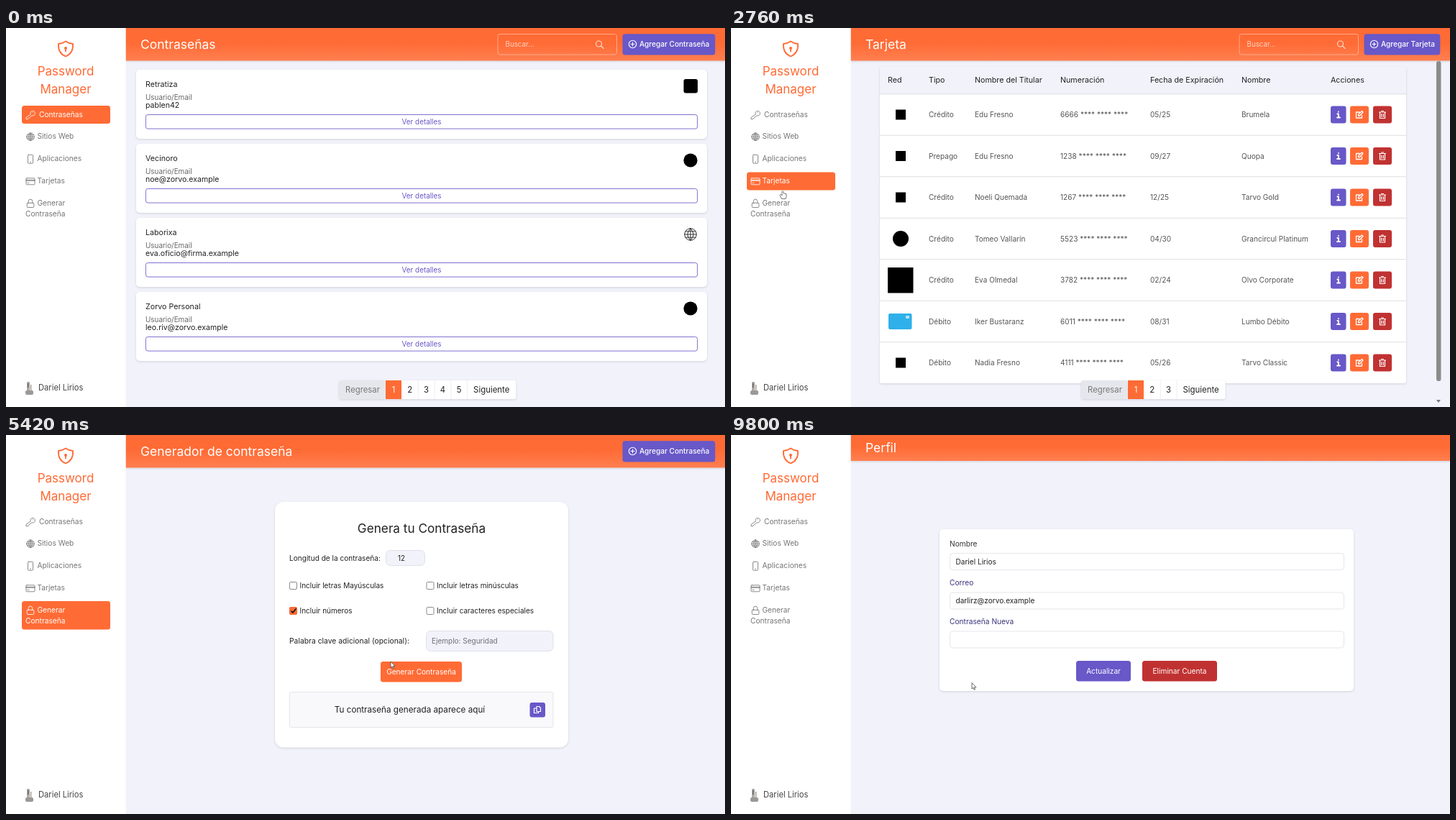
An HTML page for the animation above (9.82 s loop, 1000 by 527 pixels).

```html
<!DOCTYPE html>
<html lang="es">
<head>
<meta charset="utf-8">
<title>Password Manager</title>
<style>
html, body { margin: 0; height: 100%; overflow: hidden; background: #f2f2fb; }
svg { display: block; width: 100%; height: 100%; font-family: Inter, "Open Sans", sans-serif; }
text { white-space: pre; }
.card { filter: drop-shadow(0 1px 1.5px #0002); }
.drop { filter: drop-shadow(0 3px 5px #0005); }
</style>
</head>
<body>
<svg id="stage" viewBox="0 0 1000 527">
  <defs>
    <linearGradient id="bar" x2="0" y2="1">
      <stop offset=".45" stop-color="#ff6b35"/><stop offset="1" stop-color="#ff7f50"/>
    </linearGradient>
  </defs>
</svg>
<script>
const ORANGE = '#ff6b35', PURPLE = '#6858c8', RED = '#c03231', PALE = '#f2f2fb', GREY = '#757575', INK = '#222';
const LOOP = 9820;

// Drawing helpers; text is placed by its vertical centre
const text = (x, cy, size, str, fill = INK, anchor = 'start', weight = 400) =>
  `<text x="${x}" y="${cy + size * .36}" font-size="${size}" fill="${fill}" text-anchor="${anchor}" font-weight="${weight}">${str}</text>`;
const mid = (x, cy, size, str, fill, weight) => text(x, cy, size, str, fill, 'middle', weight);
const rect = (x, y, w, h, fill, r = 0, extra = '') =>
  `<rect x="${x}" y="${y}" width="${w}" height="${h}" rx="${r}" fill="${fill}" ${extra}/>`;
const outline = (x, y, w, h, stroke, r, fill = 'none') => rect(x, y, w, h, fill, r, `stroke="${stroke}" stroke-width=".85"`);
const line = (d, stroke, width = 1) =>
  `<path d="${d}" fill="none" stroke="${stroke}" stroke-width="${width}" stroke-linecap="round" stroke-linejoin="round"/>`;
const shape = (d, stroke) => `<path d="${d}" fill="#fff" stroke="${stroke}" stroke-width=".8"/>`;
const at = (x, y, body) => `<g transform="translate(${x} ${y})">${body}</g>`;
const group = (id, body) => `<g id="${id}">${body}</g>`;
const card = body => `<g class="card">${body}</g>`;
const ring = r => `M${-r} 0a${r} ${r} 0 1 0 ${2 * r} 0a${r} ${r} 0 1 0 ${-2 * r} 0`;
const globe = r => ring(r) + `M${-r} 0H${r}M0 ${-r}V${r}M0 ${-r}q${-r} ${r} 0 ${2 * r}q${r} ${-r} 0 ${-2 * r}` +
  `M${-r * .85} ${-r / 2}H${r * .85}M${-r * .85} ${r / 2}H${r * .85}`;

// Sidebar
const icons = [
  'M0-1a3.3 3.3 0 1 1 2 2L-4 6H-6V4ZM3-3h.3',
  globe(5.3),
  'M-2.5-6h5q1 0 1 1V5q0 1-1 1h-5q-1 0-1-1V-5q0-1 1-1ZM-.6 4H.6',
  'M-5-4.5H5q1 0 1 1v7q0 1-1 1H-5q-1 0-1-1v-7q0-1 1-1ZM-6-2H6M-6-1H6M-4 2h2',
  'M-4-.5h8q.8 0 .8.8v4.4q0 1-1 1h-7.6q-1 0-1-1V.3q0-.8.8-.8ZM-2.7-.5V-3a2.7 2.7 0 0 1 5.4 0v2.5'
];
const items = [
  { label: 'Contraseñas', x: 46, y: 108, h: 25 },
  { label: 'Sitios Web', x: 43.5, y: 138.5, h: 25.5 },
  { label: 'Aplicaciones', x: 43.5, y: 169.5, h: 25.5 },
  { label: 'Tarjetas', x: 43.5, y: 200.5, h: 25 },
  { label: 'Generar', x: 43.5, y: 231, h: 39.5 }
];
function itemBody(i, color) {
  const { label, x, y } = items[i], cy = y + 12.3;
  return at(34, cy + .5, line(icons[i], color, .85)) + text(x, cy, 10.2, label, color) +
    (i === 4 ? text(27, 258, 10.2, 'Contraseña', color) : '');
}
const itemState = (kind, i, bg, color) =>
  group(kind + i, rect(22, items[i].y, 123, items[i].h, bg, 3.5) + itemBody(i, color));

const avatar = rect(29, 492, 4, 14, '#aaa', 1) + rect(32, 496, 4, 13, '#cbc5be') +
  rect(27, 504, 11, 6, '#999', 2) + rect(30, 494, 1.5, 6, '#666');

const sidebar = rect(0, 0, 166.5, 527, '#fff') +
  at(83, 29, line('M0-10.5Q5-7 10-7Q11 6 0 10.5Q-11 6-10-7Q-5-7 0-10.5Z', ORANGE, 1.8) +
    `<circle cy="-1" r="2" fill="${ORANGE}"/>` + line('M0 0V3.5', ORANGE, 1.8)) +
  mid(83, 60, 17, 'Password', ORANGE) + mid(83, 85, 17, 'Manager', ORANGE) +
  items.map((_, i) => itemBody(i, GREY) + itemState('hover', i, PALE, '#333') + itemState('active', i, ORANGE, '#fff')).join('') +
  avatar + text(45, 500, 11.2, 'Dariel Lirios', '#444') +
  group('menu', `<g class="drop">${outline(22.5, 422.5, 108, 66, '#ccc', 3, '#fff')}</g>` +
    group('overPerfil', rect(23, 423, 107, 32, '#f4f5f6')) + group('overSalir', rect(23, 457, 107, 31, '#f4f5f6')) +
    line('M23 456H130', '#ddd') + text(33, 439, 10.6, 'Perfil') + text(33, 472, 10.6, 'Salir', '#666'));

// Shared page parts
function header(title, label, left, search, h = 45.5) {
  let out = card(rect(166.5, 0, 833.5, h, 'url(#bar)')) + text(187, h / 2, 17.5, title, '#fff');
  if (search) out += outline(left - 173.5, 8.5, 165.5, 28.5, '#ffb598', 3) + text(left - 163, 22.5, 9.8, 'Buscar...', '#ffd3c2') +
    at(left - 33, 22, line(ring(4) + 'M3 3L6.5 6.5', '#ffe1d5', 1.1));
  if (label) out += rect(left, 8.3, 986.3 - left, 29.2, PURPLE, 3.5) +
    at(left + 14, 22.5, line(ring(5.2) + 'M-2.5 0h5M0-2.5v5', '#fff', 1.1)) +
    text(left + 23.5, 22.5, 10.1, label, '#fff', 'start', 500);
  return out;
}
function pager(x, count) {
  const first = x + 76, step = 22.8, end = first + step * (count - 1);
  let out = card(rect(x, 490, end + 79 - x, 26, '#fff', 3)) + rect(x, 490, 65, 26, '#e6e7ec', 3) +
    rect(x + 65, 490, 22, 26, ORANGE) + mid(x + 33, 503, 11.3, 'Regresar', '#777');
  for (let i = 0; i < count; i++) {
    out += mid(first + step * i, 503, 11.3, i + 1, i ? INK : '#fff');
    if (i) out += line(`M${first + step * i + 11.5} 490.5v25`, '#eee');
  }
  return out + mid(end + 45, 503, 11.4, 'Siguiente');
}
const button = (x, y, w, h, label, fill) => rect(x, y, w, h, fill, 3.5) + mid(x + w / 2, y + h / 2, 10.15, label, '#fff');

// Password list
const disc = '<circle cx="952" cy="81" r="9.6"/>';
const accounts = [
  ['Retratiza', 'pablen42', rect(942.5, 71, 19.5, 19.5, '#000', 3)],
  ['Vecinoro', 'noe@zorvo.example', disc],
  ['Laborixa', 'eva.oficio@firma.example', at(952, 81, line(globe(8.3), INK, .9))],
  ['Zorvo Personal', 'leo.riv@zorvo.example', disc]
];
const passwords = header('Contraseñas', 'Agregar Contraseña', 857.5, true) +
  accounts.map(([name, user, mark], i) => at(0, 103 * i,
    card(rect(181, 58, 794, 96, '#fff', 5)) + text(194, 78, 10.7, name) +
    text(194, 96, 9.9, 'Usuario/Email', '#666') + text(194, 107.5, 10.6, user) + mark +
    outline(194.4, 120.5, 767.2, 19.6, PURPLE, 3) + mid(578, 130, 9.9, 'Ver detalles', PURPLE))).join('') + pager(463, 5);

// Card table
const columns = [218, 275, 339, 458, 583, 710, 834];
const titles = ['Red', 'Tipo', 'Nombre del Titular', 'Numeración', 'Fecha de Expiración', 'Nombre', 'Acciones'];
const rows = [
  ['small', 'Crédito', 'Edu Fresno', '6666', '05/25', 'Brumela'],
  ['small', 'Prepago', 'Edu Fresno', '1238', '09/27', 'Quopa'],
  ['small', 'Crédito', 'Noeli Quemada', '1267', '12/25', 'Tarvo Gold'],
  ['dot', 'Crédito', 'Tomeo Vallarín', '5523', '04/30', 'Grancircul Platinum'],
  ['large', 'Crédito', 'Eva Olmedal', '3782', '02/24', 'Olvo Corporate'],
  ['blue', 'Débito', 'Iker Bustaranz', '6011', '08/31', 'Lumbo Débito'],
  ['small', 'Débito', 'Nadia Fresno', '4111', '05/26', 'Tarvo Classic']
];
const marks = {
  small: rect(229, -7, 14, 14, '#000'),
  dot: '<circle cx="236" r="11"/>',
  large: rect(218, -17.5, 35.5, 35.5, '#000'),
  blue: rect(219, -11, 32.5, 22, '#2fb0ea', 2) + rect(243, -8, 5, 4, '#b9e3f6', 1)
};
const actions = rect(834, -12, 21.5, 24, PURPLE, 3) + rect(861, -12, 26, 24, ORANGE, 3) + rect(893, -12, 26, 24, RED, 3) +
  line('M844.9-4v.2M843.3-1h1.6v5M843 4h4', '#fff', 1.8) +
  at(874, 0, line('M0-3.5H-4.5V4.5H3.5V1M-1.5 1.5V-.5L3.5-5L5-3.5L.5 1.5Z', '#fff', 1.3)) +
  at(906, 0, line('M-4.5-3.5h9M-1.5-5h3M-3.5-3.5V5h7V-3.5M-1.3-1V3M1.3-1V3', '#fff', 1.2));
const cards = header('Tarjeta', 'Agregar Tarjeta', 880.5, true) +
  card(rect(207, 54, 732, 440, PALE, 4) + rect(207, 92, 732, 402, '#fff', 3)) +
  titles.map((title, i) => text(columns[i], 72.5, 10.7, title)).join('') +
  rows.map(([mark, ...cells], i) => at(0, 120.5 + 57.5 * i,
    marks[mark] + actions + line('M207-28.7H939', '#dcdce0', .9) +
    cells.map((cell, c) => text(columns[c + 1], 0, 10.1, c === 2 ? cell + ' **** **** ****' : cell, '#555')).join(''))).join('') +
  pager(487, 3) + rect(981, 46, 6.5, 445, '#8b8b8b', 3) + '<path d="M981 517h6l-3 4z" fill="#777"/>';

// Generator
const checkbox = (x, y, label) => outline(x + .5, y - 5, 10, 10, '#777', 1.5, '#fff') + text(x + 14.5, y, 10, label);
const generator = header('Generador de contraseña', 'Agregar Contraseña', 857.5) +
  card(rect(374, 93, 408, 341.5, '#fff', 12)) + mid(578, 129.5, 17.2, 'Genera tu Contraseña') +
  text(394, 171, 10.1, 'Longitud de la contraseña:') + outline(528.5, 160.5, 54, 21, '#dcdce6', 6, PALE) + mid(550, 171, 9.9, '12') +
  checkbox(394, 209.5, 'Incluir letras Mayúsculas') + checkbox(584.5, 209.5, 'Incluir letras minúsculas') +
  checkbox(394, 244.5, 'Incluir números') + checkbox(584.5, 244.5, 'Incluir caracteres especiales') +
  group('check', outline(394.5, 239.5, 10, 10, ORANGE, 1.5, ORANGE) + line('M397 245l2 2 4-5', '#111', 1.7)) +
  text(394, 286.5, 10.35, 'Palabra clave adicional (opcional):') +
  outline(584.5, 272.5, 176.5, 28, '#dcdce6', 6, PALE) + text(592, 286.5, 10, 'Ejemplo: Seguridad', '#6f6f78') +
  button(521, 315, 113, 28.5, 'Generar Contraseña', ORANGE) +
  outline(394.5, 357.5, 366.5, 49, '#e2e2e6', 2, '#f9f9fb') +
  group('empty', mid(561.5, 382, 11.7, 'Tu contraseña generada aparece aquí')) + group('result', mid(562, 382, 11, '759695405609')) +
  rect(728.5, 372, 21.5, 20.5, PURPLE, 3) +
  at(739, 382, line('M-1-4.5H2.5L4.5-2.5V2.5H-1ZM-1-2H-4.5V4.5H1.5V2.5', '#fff', 1.2));

// Profile
const field = (y, label, value, color) => text(304, y, 10.2, label, color) +
  outline(304.5, y + 13.5, 548, 23, '#e2e2ea', 4, '#fff') + text(312.5, y + 25, 10.1, value);
const profile = header('Perfil', '', 0, false, 36) + card(rect(290, 131, 576, 225, '#fff', 5)) +
  field(151, 'Nombre', 'Dariel Lirios', '#333') + field(205.5, 'Correo', 'darlirz@zorvo.example', '#39337c') +
  field(259.5, 'Contraseña Nueva', '', '#39337c') +
  button(480, 314, 76, 28.5, 'Actualizar', PURPLE) + button(572, 314, 104, 28.5, 'Eliminar Cuenta', RED);

const pointers =
  group('hand', shape('M-1 1.5V7L-2.5 5.5Q-4 5.5-4 6.5L-1.5 11.5H4L5 8V4.8L1 3.8V1.5Q0-.5-1 1.5Z', '#555')) +
  group('arrow', shape('M0 0V8.5L2 6.8L3.3 9.8L4.6 9.2L3.3 6.3H6Z', '#444'));

const pages = [[0, 'passwords', passwords], [2380, 'cards', cards], [3950, 'generator', generator], [9060, 'profile', profile]];
const stage = document.getElementById('stage');
stage.innerHTML += pages.map(([, id, body]) => group(id, body)).join('') + sidebar + group('cursor', pointers);

const el = {};
stage.querySelectorAll('g[id]').forEach(g => el[g.id] = g);
const show = (id, on) => el[id].style.display = on ? '' : 'none';

// Timeline: active menu entry, then pointer positions
const selected = [[-999, 0], [1120, 1], [1525, 2], [2370, 3], [4010, 4], [9060, -1]];
const track = [
  [90, 430, 540], [1030, 90, 151], [1350, 88, 153], [1610, 83, 193], [1800, 78, 211], [2690, 74, 215],
  [2760, 72, 226], [2840, 69, 240], [3430, 66, 243], [4050, 66, 243], [4460, 399, 243], [4660, 399, 244],
  [4810, 403, 247], [5420, 535, 315], [5700, 562, 328], [5900, 562, 328], [6780, 75, 499], [7100, 75, 499],
  [7900, 103, 470], [8200, 105, 471], [8350, 105, 471], [8800, 66, 439], [9060, 66, 439], [9530, 335, 344.5], [LOOP, 335, 344.5]
];
const clamp = v => Math.max(0, Math.min(1, v));
function pointerAt(t) {
  const i = Math.max(1, track.findIndex(k => k[0] > t));
  const [t0, x0, y0] = track[i - 1], [t1, x1, y1] = track[i];
  const p = clamp((t - t0) / (t1 - t0)), e = p * p * (3 - 2 * p);
  return [x0 + (x1 - x0) * e, y0 + (y1 - y0) * e];
}

function render(t) {
  const page = pages.findLast(p => p[0] <= t)[1];
  pages.forEach(p => show(p[1], p[1] === page));

  const [x, y] = pointerAt(t), inSidebar = x > 22 && x < 145;
  const step = selected.findLastIndex(s => s[0] <= t), fade = clamp((t - selected[step][0]) / 150);
  items.forEach((item, i) => {
    const on = i === selected[step][1] ? fade : step && i === selected[step - 1][1] ? 1 - fade : 0;
    el['active' + i].style.opacity = on;
    show('hover' + i, inSidebar && y > item.y && y < item.y + item.h);
  });

  show('check', t >= 4630);
  show('empty', t < 5790);
  show('result', t >= 5790);
  show('menu', t >= 6940 && t < 9060);
  show('overPerfil', inSidebar && y > 423 && y < 455);
  show('overSalir', inSidebar && y > 457 && y < 488);

  const onButton = t > 5450 && x > 521 && x < 634 && y > 315 && y < 343;
  const hand = inSidebar && y > 108 && (y < 271 || y > 423) || onButton;
  show('cursor', t >= 90);
  show('hand', hand);
  show('arrow', !hand);
  el.cursor.setAttribute('transform', `translate(${x} ${y})`);
}

function tick() {
  render(performance.now() % LOOP);
  requestAnimationFrame(tick);
}
tick();
</script>
</body>
</html>
```
